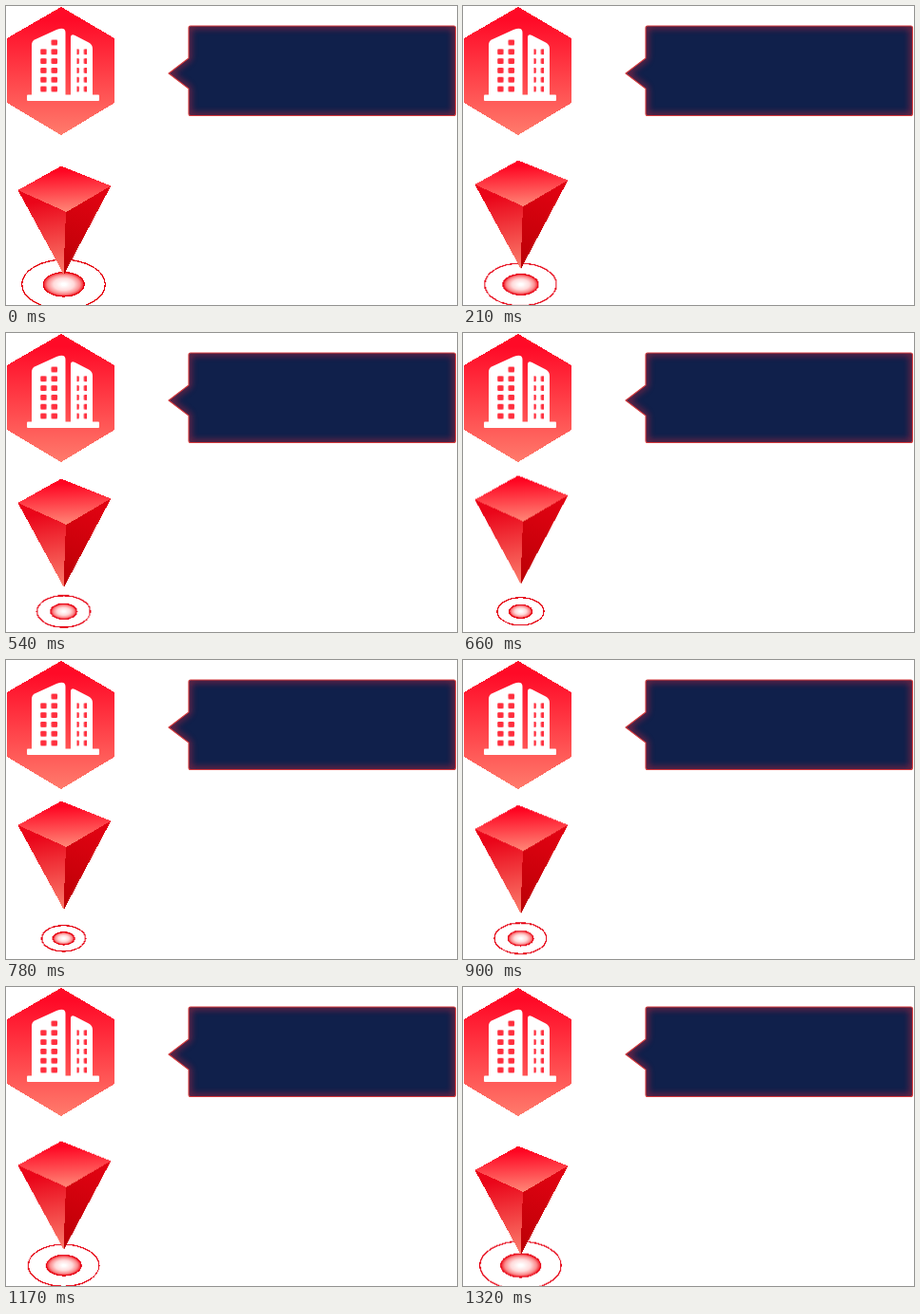
Recreate the animation shown at these times as an HTML page. Size 474 by 315 pixels, loop 1350 ms.

```html
<!DOCTYPE html>
<html lang="en">
<head>
<meta charset="utf-8">
<title>Map pin</title>
<style>
  html, body { margin: 0; width: 100%; height: 100%; overflow: hidden; background: #fff; }
  svg { display: block; width: 474px; height: 315px; }
  .crisp { shape-rendering: crispEdges; }
  .pin { animation: lift 1350ms infinite; }
  .rings { transform-origin: 60.5px 293.3px; animation: shrink 1350ms infinite; }
  .rings ellipse { vector-effect: non-scaling-stroke; }
  /* 25 steps up, 20 steps down, 30 ms each */
  @keyframes lift {
    0% { transform: translateY(0); animation-timing-function: steps(25); }
    55.5556% { transform: translateY(-21px); animation-timing-function: steps(20); }
    100% { transform: translateY(0); }
  }
  @keyframes shrink {
    0% { transform: scale(1); animation-timing-function: steps(25); }
    55.5556% { transform: scale(.5); animation-timing-function: steps(20); }
    100% { transform: scale(1); }
  }
</style>
</head>
<body>
<svg viewBox="0 0 474 315">
  <defs>
    <linearGradient id="badge" x1="0" y1="0" x2="0" y2="1">
      <stop offset=".1" stop-color="#ff0a27"/>
      <stop offset="1" stop-color="#ff7b6c"/>
    </linearGradient>
    <linearGradient id="top" gradientUnits="userSpaceOnUse" x1="60" y1="169" x2="62" y2="217">
      <stop offset=".1" stop-color="#ff0522"/>
      <stop offset="1" stop-color="#ff8777"/>
    </linearGradient>
    <linearGradient id="left" gradientUnits="userSpaceOnUse" x1="40" y1="196" x2="54" y2="282">
      <stop offset=".1" stop-color="#ea0519"/>
      <stop offset="1" stop-color="#fb7c6c"/>
    </linearGradient>
    <linearGradient id="right" gradientUnits="userSpaceOnUse" x1="92" y1="196" x2="62" y2="276">
      <stop offset="0" stop-color="#e00312"/>
      <stop offset="1" stop-color="#bd0006"/>
    </linearGradient>
    <radialGradient id="spot">
      <stop offset=".1" stop-color="#fff"/>
      <stop offset=".5" stop-color="#ffdada"/>
      <stop offset=".8" stop-color="#fb8a8c"/>
      <stop offset="1" stop-color="#f0141f"/>
    </radialGradient>
    <path id="bubble" d="M194 21H470.5Q472.5 21 472.5 23V113.5Q472.5 115.5 470.5 115.5H194Q192 115.5 192 113.5V87L171 71L192 55V23Q192 21 194 21Z"/>
    <clipPath id="inside"><use href="#bubble"/></clipPath>
    <filter id="blur" filterUnits="userSpaceOnUse" x="150" y="0" width="324" height="140">
      <feGaussianBlur stdDeviation="3.5"/>
    </filter>
    <filter id="soft"><feGaussianBlur stdDeviation=".6"/></filter>
    <pattern id="windows" patternUnits="userSpaceOnUse" x="34" y="33.6" width="11.4" height="9.8">
      <rect x="2.2" y="2" width="6.4" height="5.8" rx="1.2" fill="#ff2f3e"/>
    </pattern>
  </defs>

  <polygon class="crisp" points="58,1 114,34 114,102 58,136 1,102 1,34" fill="url(#badge)"/>
  <g filter="url(#soft)">
    <g fill="#fff">
      <path d="M27 94V41Q27 37 30 35.5L53 25Q62.5 21.5 62.5 28V94Z"/>
      <path d="M68 94V33Q68 29 72.5 31L87 38.5Q91 40.5 91 45V94Z"/>
      <rect x="22" y="93.5" width="76" height="6.5" rx="1"/>
    </g>
    <path d="M34 43.4H45.4V33.6H56.8V92.4H34ZM74.5 43.4H85V92.4H74.5Z" fill="url(#windows)"/>
  </g>

  <use href="#bubble" fill="#10204b"/>
  <g clip-path="url(#inside)">
    <use href="#bubble" fill="none" stroke="#e0283a" stroke-width="5" opacity=".55" filter="url(#blur)"/>
  </g>
  <use href="#bubble" fill="none" stroke="#d63a3c" stroke-width="1.1"/>

  <g class="rings crisp" stroke="#e60012">
    <ellipse cx="60.5" cy="293.3" rx="43.8" ry="26" fill="none" stroke-width="1.3"/>
    <ellipse cx="60.7" cy="293.3" rx="21.5" ry="12.7" fill="url(#spot)" stroke-width="1.2"/>
  </g>

  <g class="pin crisp">
    <polygon points="12.5,194 63.5,216 61,282 60.3,282" fill="url(#left)"/>
    <polygon points="63,216 110.3,189.5 61.3,282 60.5,282" fill="url(#right)"/>
    <polygon points="58,168.6 110.3,189.5 63.5,217 12.5,194" fill="url(#top)"/>
  </g>
</svg>
</body>
</html>
```
